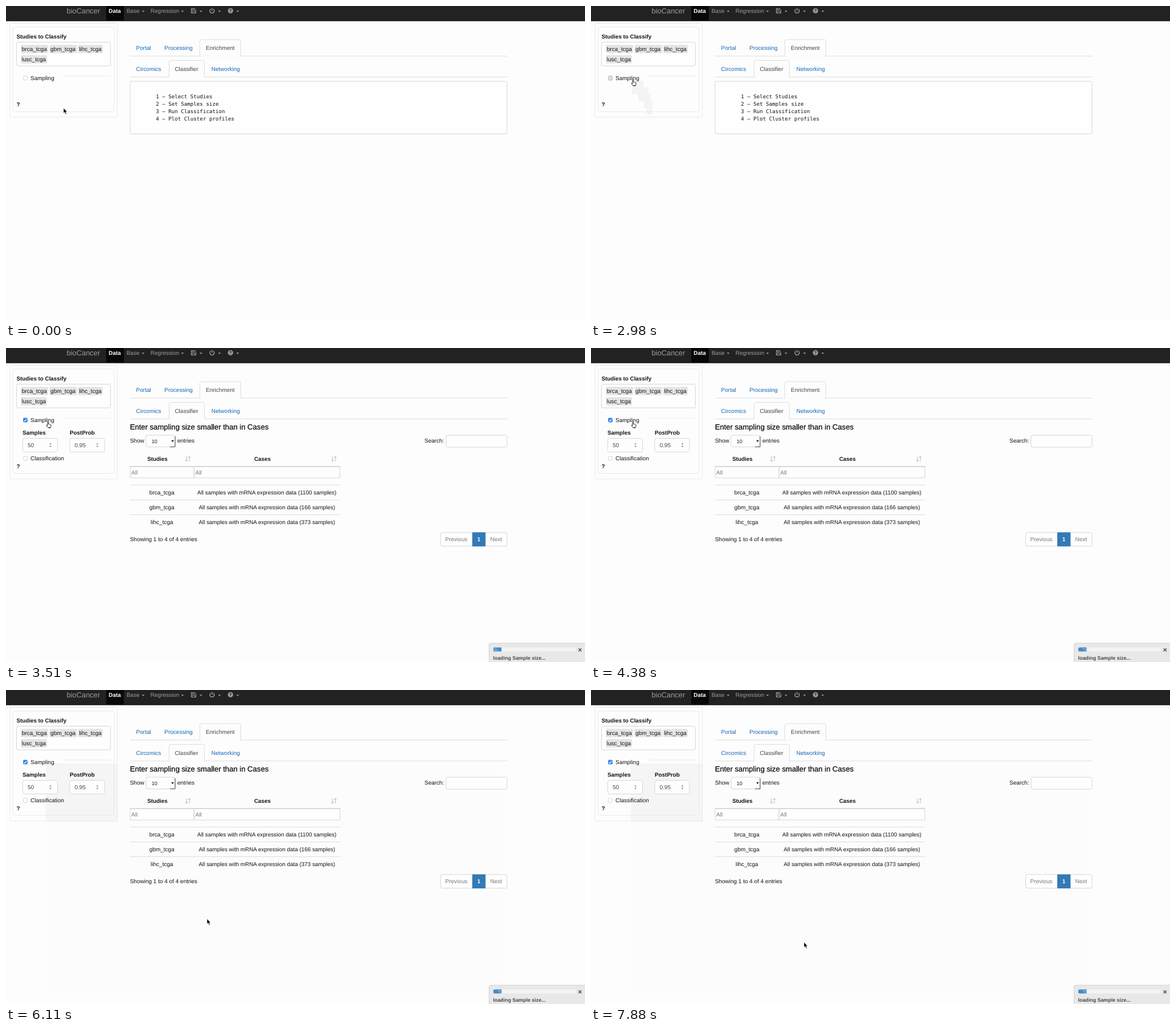
These frames come from a looping animation (1017x551 px, 8 s). An HTML page:

```html
<!DOCTYPE html>
<html lang="en">
<head>
<meta charset="utf-8">
<title>bioCancer</title>
<style>
  html, body { margin: 0; width: 100%; height: 100%; overflow: hidden; background: #fdfdfd; }
  svg { display: block; width: 100vw; height: 100vh; }
  text { font: 10px "Liberation Sans", Arial, sans-serif; fill: #141414; white-space: pre; text-rendering: geometricPrecision; }
  .b { font-weight: bold; font-size: 9.9px; }
  .mid { text-anchor: middle; }
  .link { fill: #1267b6; }
  .nav { fill: #9d9d9d; }
  .grey { fill: #777; }
  .field { fill: #444; }
  .mono { font: 9.17px "DejaVu Sans Mono", monospace; }
  .box { fill: #fefefe; stroke: #d6d6d6; }
  .frame { fill: none; stroke: #e9e9e9; }
  .line { stroke: #ddd; }
</style>
</head>
<body>
<svg id="stage" viewBox="0 0 1017 551" preserveAspectRatio="none"></svg>
<script>
const text = (x, y, s, cls = '', extra = '') => `<text x="${x}" y="${y}" class="${cls}" ${extra}>${s}</text>`;
const rect = (x, y, w, h, attrs) => `<rect x="${x}" y="${y}" width="${w}" height="${h}" ${attrs}/>`;
const box = (x, y, w, h, cls = 'box', r = 3) => rect(x, y, w, h, `class="${cls}" rx="${r}"`);
const line = (x1, y, x2, attrs = '') => `<path class="line" d="M${x1} ${y}H${x2}" ${attrs}/>`;
const path = (d, attrs = '') => `<path d="${d}" ${attrs}/>`;
const group = (id, body) => `<g id="${id}">${body}</g>`;
const $ = id => document.getElementById(id);

const caret = x => path(`M${x - 2.5} 8.2h5l-2.5 2.6z`, 'fill="#9d9d9d"');
const chip = (x, y, w, s) => rect(x, y, w, 14.5, 'rx="2" fill="#e4e4e4"') + text(x + 1.8, y + 10.8, s);
const checkbox = (y, fill, stroke) => rect(30.5, y, 7, 7, `rx="1.5" fill="${fill}" stroke="${stroke}" stroke-width=".8"`);
const number = (x, s) => box(x, 158.5, 61, 24) + text(x + 8.5, 174.3, s, 'field') +
  path(`M${x + 46.5} 169.3l2-2.6 2 2.6zM${x + 46.5} 171.7l2 2.6 2-2.6z`, 'fill="#8a8a8a"');
const sortIcon = x => path(`M${x - 2.5} 190v8.5m-2-2 2 2.3 2-2.3M${x + 2.5} 199v-8.5m-2 2 2-2.3 2 2.3`,
  'fill="none" stroke="#ccc" stroke-width="1.3"');

const navbar = rect(0, 0, 1017, 26.4, 'fill="#222"') + rect(0, 25.4, 1017, 1, 'fill="#101010"') +
  rect(176, 0, 31, 25.6, 'fill="#080808"') +
  text(106.5, 13, 'bioCancer', 'nav', 'style="font-size:12.9px"') +
  text(180.3, 12, 'Data', 'b', 'style="fill:#fff"') +
  text(211.7, 12, 'Base', 'nav') + text(253.8, 12, 'Regression', 'nav') +
  [241, 310, 342.5, 375, 407].map(caret).join('') +
  path('M325.5 4.5h6l2 2v6h-8zM327 4.5v2.7h3.6V4.5M327 12.5V9.3h5v3.2', 'fill="none" stroke="#9d9d9d"') +
  path('M359.7 5.3a3.9 3.9 0 1 0 4.6 0M362 3.5v4.8', 'fill="none" stroke="#9d9d9d" stroke-width="1.4"') +
  '<circle cx="394.3" cy="8.3" r="4.6" fill="#9d9d9d"/>' +
  text(394.3, 11.2, '?', 'mid', 'style="font-size:8px;font-weight:bold;fill:#222"');

const tabs = line(218, 87.9, 880) + line(218, 124.5, 880) +
  path('M340.5 88.6V62q0-3 3-3h66q3 0 3 3v26.6', 'fill="#fdfdfd" stroke="#ddd"') +
  path('M286.5 125.2V98.5q0-3 3-3h56q3 0 3 3v26.7', 'fill="#fdfdfd" stroke="#ddd"') +
  text(228.6, 77.2, 'Portal', 'link') + text(278.3, 77.2, 'Processing', 'link') +
  text(351, 77.2, 'Enrichment', 'field') +
  text(228.6, 113.8, 'Circomics', 'link') + text(296.4, 113.8, 'Classifier', 'field') +
  text(360.8, 113.8, 'Networking', 'link');

// Grey patches the pointer leaves on the sidebar: [time, x, y, w, h]
const patches = [[440, 100, 177, 8, 14], [1010, 97, 167, 11, 22], [1150, 93, 155, 12, 24],
  [1450, 83, 142, 18, 25], [1600, 72, 131, 20, 24]];
const trail = patches.map(([, x, y, w, h]) => rect(x, y, w, h, 'fill="#f4f4f4"')).join('');

const sidebar = text(18.5, 57, 'Studies to Classify', 'b', 'style="font-size:9.8px"') +
  box(18.5, 63.5, 165, 41.5) +
  chip(26, 68.3, 48, 'brca_tcga') + chip(76.3, 68.3, 48.5, 'gbm_tcga') +
  chip(126.5, 68.3, 43.5, 'lihc_tcga') + chip(26, 86.2, 46, 'lusc_tcga') +
  line(101, 123, 184, 'style="stroke:#e8e8e8"') + text(43, 130, 'Sampling');

const steps = ['1 – Select Studies', '2 – Set Samples size', '3 – Run Classification', '4 – Plot Cluster profiles'];
const intro = group('trail', trail) +
  box(7, 30.5, 188.5, 164.5, 'frame') + box(12.5, 37, 177.5, 148.5, 'frame') +
  checkbox(123, '#fefefe', '#ccc') + group('pressed', checkbox(123, '#e2e2e2', '#aaa')) +
  text(18.5, 176.3, '?', 'b') + box(218, 132.2, 662, 92.3) +
  steps.map((s, i) => text(263.2, 162 + i * 13.1, s, 'mono')).join('');

const rows = [['brca', 1100], ['gbm', 166], ['lihc', 373]];
const results = group('tint', rect(70, 129, 800, 403, 'fill="#fcfcfc"') + rect(70, 129, 126, 101.5, 'fill="#f5f5f5"')) +
  box(7, 30.5, 188.5, 199.5, 'frame') + box(12.5, 37, 177.5, 183, 'frame') +
  checkbox(123, '#2f82ea', '#2f82ea') + path('M32 126.8l1.5 1.7 2.7-3.9', 'fill="none" stroke="#fff" stroke-width="1.2"') +
  text(29, 151.8, 'Samples', 'b') + text(112, 151.8, 'PostProb', 'b') +
  number(29.5, '50') + number(112, '0.95') +
  checkbox(190.2, '#fefefe', '#ccc') + text(43, 197, 'Classification') + text(18.5, 211, '?', 'b') +
  text(217.7, 143.2, 'Enter sampling size smaller than in Cases', '', 'style="font-size:13.08px;stroke:#141414;stroke-width:.3"') +
  text(217.7, 165.6, 'Show') + box(246, 153, 51, 20.5) +
  path('M297 155v18.5h-9', 'fill="none" stroke="#444"') + path('M290.3 162h4.6l-2.3 3z') +
  text(255.7, 166.5, '10', '', 'style="font-size:9px"') + text(301, 165.6, 'entries') +
  text(735, 165.6, 'Search:') + box(773, 153, 107, 21) +
  text(266, 198.4, 'Studies', 'b mid') + text(450.5, 198.4, 'Cases', 'b mid') +
  sortIcon(319.5) + sortIcon(576) +
  box(218, 208.5, 112, 19.5, 'box', 0) + box(330.5, 208.5, 256, 19.5, 'box', 0) +
  line(217.5, 208, 587, 'style="stroke:#d8d8d8;stroke-width:2"') +
  text(220, 222.4, 'All', 'grey') + text(332.5, 222.4, 'All', 'grey') +
  rows.map(([name, n], i) => line(217.5, 240.5 + i * 26, 587) +
    text(273.8, 257.2 + i * 26, name + '_tcga', 'mid') +
    text(458.2, 257.2 + i * 26, `All samples with mRNA expression data (${n} samples)`, 'mid', 'style="font-size:9.87px"')).join('') +
  text(217.7, 338.8, 'Showing 1 to 4 of 4 entries') +
  box(763.5, 323.8, 116.5, 24) + rect(819, 323.5, 23.3, 24.6, 'fill="#337ab7"') +
  text(791, 339.3, 'Previous', 'grey mid') +
  text(830.5, 339.3, '1', 'b mid', 'style="fill:#fff"') + text(860.8, 339.3, 'Next', 'grey mid');

const stripes = [0, 29, 58].map(x => `M${x} 525h14.5l7 7h-14.5z`).join('');
const notice = rect(848.5, 518, 175, 40, 'rx="3" fill="#e8e8e8" stroke="#d2d2d2"') +
  rect(856, 525.4, 145, 7, 'rx="2" fill="#f3f3f3"') +
  '<clipPath id="bar"><path d="M858 525.4h12.3v7H858q-2 0-2-2v-3q0-2 2-2z"/></clipPath><g clip-path="url(#bar)">' +
  rect(856, 525, 15, 8, 'fill="#4688c4"') + group('stripes', path(stripes, 'fill="#659dd0"')) + '</g>' +
  path('M1005.8 527.3l5 5m0-5-5 5', 'stroke="#4c4c4c" stroke-width="1.5"') +
  text(855.5, 546.8, 'loading Sample size...', 'b', 'style="font-size:8.9px;fill:#484848"');

const arrow = path('M0 0V9.2L2.1 7.3 3.7 11 5.4 10.2 3.9 6.7H6.6Z', 'stroke="#fff" stroke-width=".7"');
const hand = path('M2.2 5.6V1.2q.8-1.3 1.6 0V4q1.2-.6 1.6.3 1.1-.4 1.4.4 1.2-.2 1.3.8V8L7.3 10.3H3.2L.6 7.2Q-.1 5.6 1 5.6L2.2 6.7Z',
  'fill="#fff" stroke="#111" stroke-width=".9"') + path('M4 10.3h3', 'stroke="#111"');

$('stage').innerHTML = rect(0, 0, 1017, 551, 'fill="#fdfdfd"') + navbar + tabs +
  group('intro', intro) + group('results', results) + sidebar + group('notice', notice) +
  group('arrow', arrow) + group('hand', hand);

const moves = [[0, 101, 179], [440, 101, 177.5], [1010, 98, 168], [1150, 94, 156], [1450, 84, 143], [1600, 73, 132.5],
  [4850, 194, 326], [5420, 266, 356], [5640, 313, 381], [5870, 341, 396], [6110, 353, 401.5], [6310, 373, 442.5], [6580, 374, 442.5]];
const ticks = [3510, 3730, 3950, 4160, 4380, 4620, 4850, 5150, 5420, 5640, 5870, 6110, 6310, 6580, 6800, 7020, 7240, 7460, 7670, 7880];
const show = (el, on) => { el.style.display = on ? '' : 'none'; };

function draw(t) {
  const [, x, y] = moves.filter(m => m[0] <= t).pop();
  const tick = ticks.filter(k => k <= t).pop() || 0;
  const onHand = t >= 1750 && t < 4850;
  show($('intro'), t < 3160);
  show($('results'), t >= 3160);
  show($('pressed'), t >= 2980);
  show($('tint'), t >= 4850);
  show($('notice'), t >= 3510);
  show($('hand'), onHand);
  show($('arrow'), !onHand);
  patches.forEach((p, i) => show($('trail').children[i], t >= p[0]));
  $('arrow').setAttribute('transform', `translate(${x} ${y})`);
  $('hand').setAttribute('transform', 'translate(70.8 129.5)');
  const shift = ((tick - 4380) / 1750 % 1 + 1) % 1 * 29;
  $('stripes').setAttribute('transform', `translate(${860 - shift} 0)`);
}

const start = performance.now();
function loop() {
  draw((performance.now() - start) % 8000);
  requestAnimationFrame(loop);
}
loop();
</script>
</body>
</html>
```
